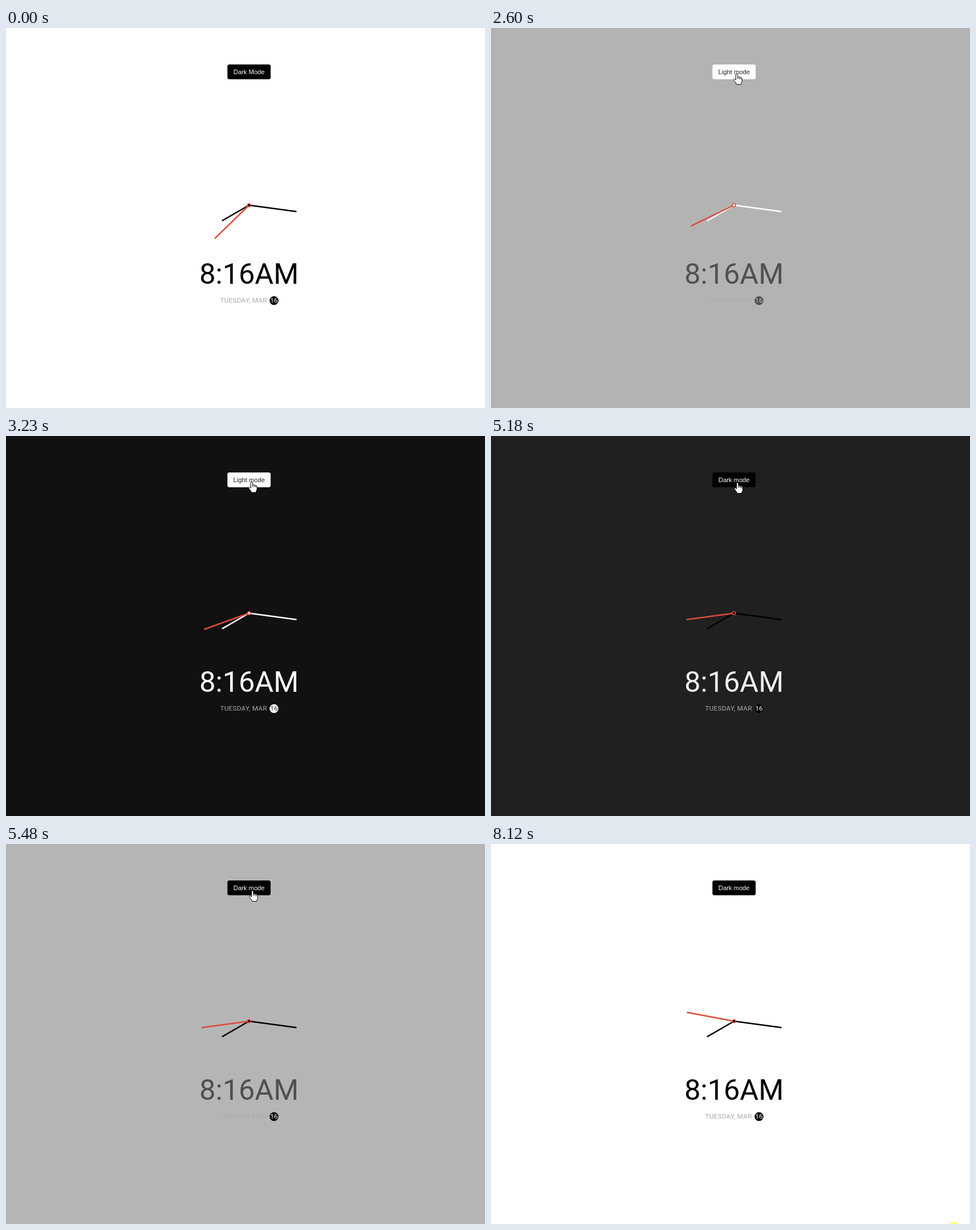
Recreate the animation shown at these times as an HTML page. Size 840 by 667 pixels, loop 8.21 s.

```html
<!DOCTYPE html>
<html lang="en">
<head>
<meta charset="utf-8">
<title>Theme clock</title>
<style>
  html, body { margin: 0; width: 100%; height: 100%; overflow: hidden; background: #fff; }
  svg { display: block; width: 840px; height: 667px; }
  text { font-family: Roboto, sans-serif; text-anchor: middle; }
  .label { font: 11.2px "Liberation Sans", Arial, sans-serif; }
  .time { font-size: 50.4px; }
  .date { font-size: 11.76px; letter-spacing: .25px; }
  .needle { stroke-width: 2.5; }
  .cursor { fill: #fff; stroke: #000; stroke-width: 1; stroke-linejoin: round; }
</style>
</head>
<body>
<svg viewBox="0 0 840 667">
  <rect id="bg" width="840" height="667"/>
  <rect id="btn" x="388.3" y="64" width="75.8" height="26" rx="3.4"/>
  <text id="label" class="label" x="426.2" y="81"></text>
  <g transform="translate(426.2 311)">
    <path id="hour" class="needle" d="M0 0V-54.6"/>
    <path id="minute" class="needle" d="M0 0V-84"/>
    <path id="second" class="needle" d="M0 0V-84" stroke="#df4a38"/>
    <circle r="3.6" fill="#df4a38"/>
    <circle id="pin" r="1.9"/>
  </g>
  <text id="time" class="time" x="426.2" y="449">8:16AM</text>
  <text class="date" x="375.4" y="482" style="text-anchor:start" fill="#aaa">TUESDAY, MAR</text>
  <circle id="dot" cx="470" cy="478.5" r="7.8"/>
  <text id="day" class="date" x="470" y="482">16</text>
  <path id="arrow" class="cursor" d="M0 0V14.5L3.3 11.4L5.6 16.6L8 15.6L5.8 10.4H10.3Z"/>
  <g id="hand" class="cursor">
    <path d="M-1.7 1.4C-1.7-.5 1.7-.5 1.7 1.4V6C2 4.7 4.4 4.9 4.6 6.4C5 5.5 7 5.7 7.1 7.1C7.6 6.5 9.2 6.8 9.2 8.3V12.5C9.2 14.5 7.5 15.8 7.3 18.6H-.6C-1.2 15.8-3.7 13.7-5.3 11.1C-6.3 9.3-4.1 8.1-2.9 9.6L-1.7 11Z"/>
    <path d="M1.7 6V9M4.6 6.4V9.3M7.1 7.1V9.6" fill="none"/>
  </g>
  <circle id="halo" cx="812" cy="673" r="10" fill="#ffff78"/>
</svg>
<script>
const LOOP = 8210, FADE = 500, TO_DARK = 2350, TO_LIGHT = 5082;
const ticks = [200, 1200, 2210, 3230, 4240, 5180, 6200, 7190, 8120];

const linear = u => u;
const easeOut = u => 1 - (1 - u) ** 2;
const easeBoth = u => u * u * (3 - 2 * u);

// time, x, y, easing towards this point
const route = [
  [70, 790, 582],
  [210, 684, 277, easeOut],
  [360, 684, 277],
  [500, 675, 275],
  [1170, 675, 275],
  [1980, 440, 93, easeOut],
  [2045, 440, 93],
  [2050, 436, 88],
  [2210, 431, 80.5],
  [5010, 431, 80.5],
  [5090, 432.3, 82],
  [6690, 432.3, 82],
  [7340, 808, 672, easeBoth]
];

const el = {};
document.querySelectorAll("[id]").forEach(n => el[n.id] = n);

const paint = (name, color, attr = "fill") => el[name].setAttribute(attr, color);
const show = (name, on) => el[name].setAttribute("visibility", on ? "visible" : "hidden");
const mix = (a, b, k) => a + (b - a) * k;
const gray = v => { v = Math.round(v); return `rgb(${v},${v},${v})`; };
const turn = (name, deg) => el[name].setAttribute("transform", `rotate(${deg})`);

// CSS ease-in, cubic-bezier(.42, 0, 1, 1)
function easeIn(x) {
  if (x <= 0) return 0;
  if (x >= 1) return 1;
  let lo = 0, hi = 1;
  for (let i = 0; i < 24; i++) {
    const s = (lo + hi) / 2;
    if (1.26 * (1 - s) ** 2 * s + easeBoth(s) < x) lo = s; else hi = s;
  }
  return easeBoth(lo);
}

function pointer(t) {
  const i = route.findIndex(p => p[0] > t);
  if (i < 1) return null;
  const [t0, x0, y0] = route[i - 1], [t1, x1, y1, ease = linear] = route[i];
  const k = ease((t - t0) / (t1 - t0));
  return [mix(x0, x1, k), mix(y0, y1, k)];
}

function drawPointer(t) {
  const p = pointer(t);
  const over = p && p[0] > 388 && p[0] < 464 && p[1] > 64 && p[1] < 90;
  show("arrow", p && !over);
  show("hand", over);
  if (p) el[over ? "hand" : "arrow"].setAttribute("transform", `translate(${p[0]} ${p[1]})`);
  show("halo", t >= 8120);
}

function draw(t) {
  const dark = t >= TO_DARK && t < TO_LIGHT;
  const fadeIn = easeIn((t - TO_DARK) / FADE);
  const night = fadeIn - easeIn((t - TO_LIGHT) / FADE);
  const main = dark ? "#fff" : "#000";

  paint("bg", gray(mix(255, 17, night)));
  paint("time", gray(255 * night));
  paint("btn", main);
  paint("label", dark ? "#222" : "#fff");
  el.label.textContent = dark ? "Light mode" : t < TO_DARK ? "Dark Mode" : "Dark mode";
  paint("hour", main, "stroke");
  paint("minute", main, "stroke");
  paint("pin", main);
  paint("dot", dark ? gray(255 * fadeIn) : "#000");
  paint("day", dark ? gray(mix(255, 51, fadeIn)) : "#fff");

  const sec = 37 + ticks.filter(s => t >= s).length;
  turn("hour", 240);
  turn("minute", 16 / 59 * 360);
  turn("second", sec / 59 * 360);
  drawPointer(t);
}

const start = performance.now();
function loop(now) {
  draw(Math.max(0, now - start) % LOOP);
  requestAnimationFrame(loop);
}
draw(0);
requestAnimationFrame(loop);
</script>
</body>
</html>
```
